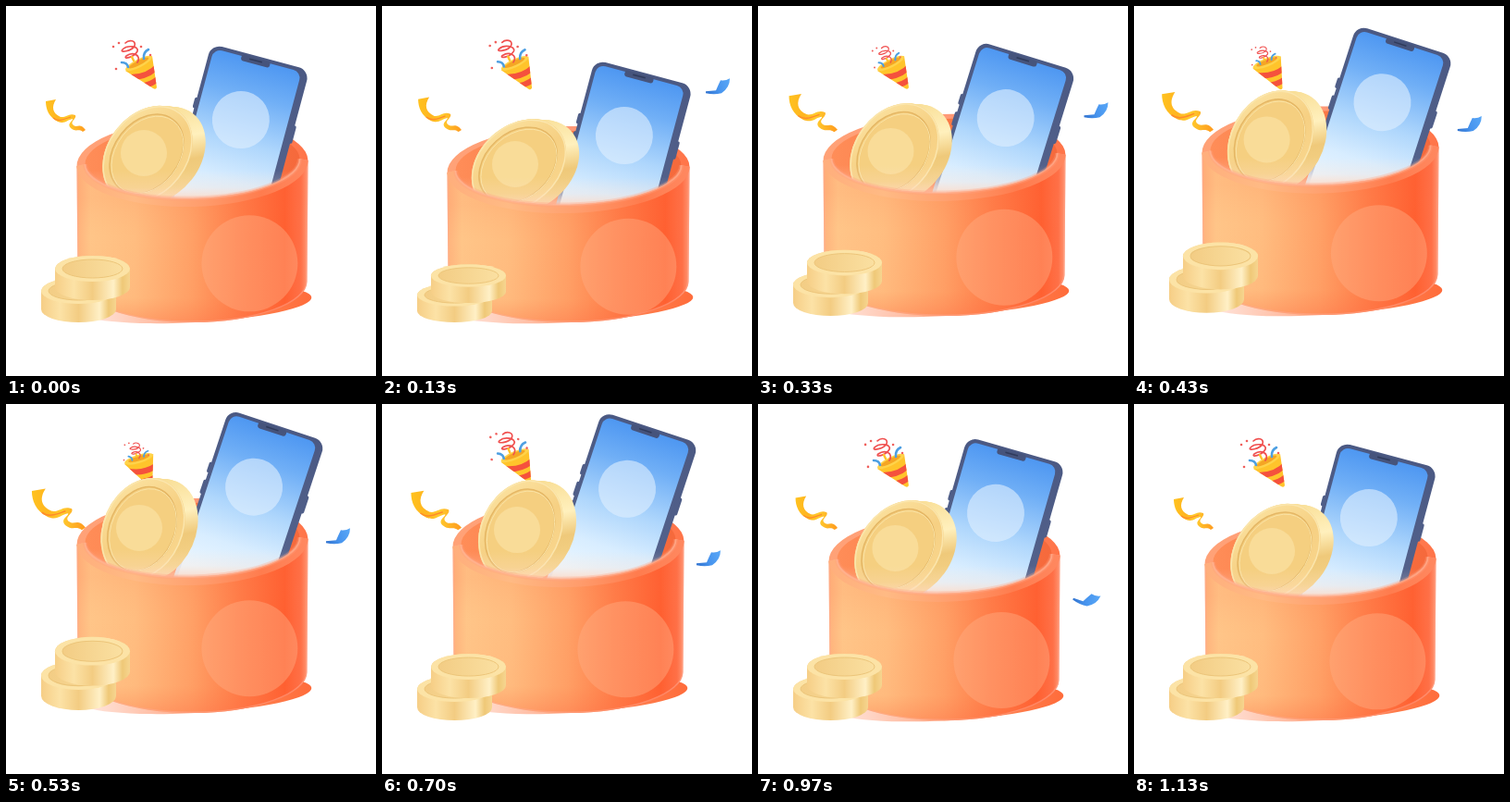
An HTML page with a canvas for the animation above (2.01 s loop, 400x400 px).

```html
<!DOCTYPE html>
<html lang="en">
<head>
<meta charset="utf-8">
<title>Gift pot</title>
<style>
  html, body { margin: 0; width: 100%; height: 100%; overflow: hidden; background: #fff; }
  canvas { display: block; width: 100vw; height: 100vh; }
</style>
</head>
<body>
<canvas id="stage"></canvas>
<script>
const LOOP = 2010;
const TIMES = [0, 130, 330, 530, 700, 830, 1130];
const TRACKS = {
  phoneX: [222, 230, 239, 241, 238, 233, 222],
  phoneY: [41, 58, 38, 6, 8, 25, 41],
  phoneA: [15, 15, 17.2, 18.3, 18.3, 17.3, 15],
  coinX: [153, 148, 147.5, 148, 150, 151.5, 153],
  coinY: [160, 172, 158, 135, 137, 150.5, 160],
  coinA: [38, 48, 36, 24, 26, 32, 38],
  potL: [76.5, 70.5, 70.5, 76.5, 76.5, 76.5, 76.5],
  rim: [208, 215, 202, 187, 189, 199, 208],
  base: [342, 342, 335, 334, 334, 341, 342],
  stackY: [342, 342, 335, 331, 342, 342, 342],
  stackS: [1, 0.87, 0.99, 1.1, 1, 1, 1],
  popY: [0, 0, 0, -2, -6, -1, 0],
  popA: [0, 2, 0, 10, 4, 1, 0],
  burst: [1, 1, 0.75, 0.68, 1, 1, 1],
  ribbon: [1, 1.09, 1.22, 1.35, 1.27, 1.15, 1],
  bitX: [360, 363, 365.5, 359, 353, 353.5, 356],
  bitY: [69, 87, 113, 143, 167, 185.5, 228]
};
const TILT = -0.025;
const TAU = Math.PI * 2;
const canvas = document.getElementById('stage');
const c = canvas.getContext('2d');

// Smooth curve through the poses, at rest at both ends.
function track(v, t) {
  const last = TIMES.length - 1;
  if (t >= TIMES[last]) return v[last];
  let i = 0;
  while (t >= TIMES[i + 1]) i++;
  const slope = k => k === 0 || k === last ? 0 : (v[k + 1] - v[k - 1]) / (TIMES[k + 1] - TIMES[k - 1]);
  const d = TIMES[i + 1] - TIMES[i], u = (t - TIMES[i]) / d, w = 1 - u;
  return w * w * (1 + 2 * u) * v[i] + u * u * (3 - 2 * u) * v[i + 1]
    + u * w * d * (w * slope(i) - u * slope(i + 1));
}

function gradient(x0, y0, x1, y1, stops) {
  const g = c.createLinearGradient(x0, y0, x1, y1);
  for (const [at, color] of stops) g.addColorStop(at, color);
  return g;
}

function fill(path, style) { c.fillStyle = style; c.fill(path); }

function line(path, style, width) {
  c.strokeStyle = style;
  c.lineWidth = width;
  c.stroke(path);
}

function oval(x, y, rx, ry, a = 0) {
  const p = new Path2D();
  p.ellipse(x, y, rx, ry, a, 0, TAU);
  return p;
}

function at(x, y, angle, draw) {
  c.save();
  c.translate(x, y);
  c.rotate(angle * Math.PI / 180);
  draw();
  c.restore();
}

function ribbon(s) {
  c.save();
  c.translate(86, 135);
  c.scale(s, 1 + (s - 1) * 0.8);
  const band = new Path2D('M-43 -32L-32 -34C-37 -26 -36 -19 -27 -15C-21 -14 -18 -20 -11 -17C-9 -13 -18 -10 -13 -6C-9 -3 -6 -9 0 -1L-3 1C-8 -3 -10 2 -16 -3C-21 -8 -13 -11 -14 -13C-20 -12 -22 -7 -30 -10C-40 -15 -43 -24 -43 -32Z');
  fill(band, gradient(-43, 0, 0, 0, [[0, '#ffc21f'], [0.3, '#ffb520'], [0.55, '#ffcb2e'], [1, '#ff9a1e']]));
  line(new Path2D('M-35 -14C-29 -9 -22 -13 -16 -15'), '#ff8a2b', 1.2);
  c.restore();
}

function popper(p) {
  at(147, 62 + p.popY, p.popA, () => {
    const cone = new Path2D('M-18 8L11 -8L16 26Q15 29 12 27Z');
    fill(cone, '#ffc42b');
    c.save();
    c.clip(cone);
    line(new Path2D('M-15 15Q6 16 18 2M-2 25Q12 23 20 14'), '#f5513d', 6);
    c.restore();
    fill(oval(-3.5, 0, 16, 4.5, -0.47), '#ffd34a');
    fill(oval(-3.5, -0.5, 12, 2.6, -0.47), '#f5a524');
    c.scale(p.burst, p.burst);
    c.lineCap = 'round';
    line(new Path2D('M-5 -1C0 -9 -10 -13 -17 -8C-21 -4 -9 -6 -5 -13C-3 -19 -16 -20 -21 -15C-25 -11 -11 -13 -8 -19C-6 -25 -14 -26 -18 -22'), '#f0504f', 1.7);
    line(new Path2D('M2 -5Q1 -12 7 -15M-22 -1Q-16 -1 -15 4'), '#4d9fe2', 2.6);
    line(new Path2D('M-9 -3L-11 -7'), '#ffc42b', 2.5);
    for (const [x, y] of [[-31, -18], [-28, 6], [9, -9], [-25, -22], [-1, -18]]) fill(oval(x, y, 1.3, 1.3), '#f0605c');
  });
}

function bit(p) {
  at(p.bitX, p.bitY, p.bitY > 170 ? (p.bitY - 170) * 0.6 : 0, () => {
    fill(new Path2D('M-13 5L-2 4Q1 -3 3 -7Q8 -6 13 -9Q13 1 4 7Q-4 9 -13 7Z'),
      gradient(-13, 4, 13, -4, [[0, '#3476d2'], [0.5, '#4794ee'], [1, '#58a6f6']]));
  });
}

function phone(p) {
  at(p.phoneX, p.phoneY, p.phoneA, () => {
    const shell = new Path2D(), screen = new Path2D(), notch = new Path2D();
    shell.roundRect(0, 0, 110, 210, 12);
    shell.roundRect(-2, 60, 5, 12, 2);
    shell.roundRect(-2, 80, 5, 16, 2);
    shell.roundRect(107, 62, 5, 20, 2);
    screen.roundRect(4, 4, 98, 206, 9);
    notch.roundRect(35, 2, 32, 7, 3);
    fill(shell, gradient(0, 0, 0, 175, [[0, '#4b5983'], [0.75, '#53628c'], [1, '#dbe8f8']]));
    fill(screen, gradient(0, 0, 0, 172, [[0, '#4b95f1'], [0.25, '#70aff6'], [0.55, '#aed6fc'], [0.8, '#d8edff'], [1, '#eaf6ff']]));
    fill(notch, '#46547c');
    line(new Path2D('M44 5H58'), '#2f3b5c', 1.5);
    fill(oval(52, 71, 31, 31), 'rgba(225,241,255,.6)');
  });
}

function bigCoin(p) {
  const a = p.coinA * Math.PI / 180, x = p.coinX, y = p.coinY;
  const edge = gradient(x + 10, y - 50, x + 28, y + 50, [[0, '#f9df98'], [0.35, '#fff0bd'], [0.6, '#efc97a'], [1, '#f6d58c']]);
  for (let i = 14; i >= 0; i--) fill(oval(x + i, y + i * 0.08, 43, 57, a), edge);
  const face = gradient(x - 30, y - 45, x + 30, y + 45, [[0, '#fbe2a0'], [0.5, '#f6d083'], [1, '#f9d78f']]);
  fill(oval(x, y, 43, 57, a), face);
  line(oval(x, y, 42, 56, a), '#fbe6ad', 1.4);
  fill(oval(x - 1, y, 35, 47, a), '#f5cf80');
  line(oval(x - 1, y, 35, 47, a), '#e5b765', 1.5);
  line(oval(x, y + 1, 34, 46, a), '#fae3a5', 1);
  fill(oval(x - 4, y - 1, 25, 25), '#f9dc98');
}

function disc(x, y) {
  const rx = 40.5, ry = 14, h = 20, side = new Path2D();
  side.ellipse(x, y + h, rx, ry, 0, 0, Math.PI);
  side.ellipse(x, y, rx, ry, 0, Math.PI, 0);
  fill(side, gradient(x - rx, 0, x + rx, 0, [[0, '#f6ce86'], [0.25, '#fce2a6'], [0.5, '#f3cc82'], [0.78, '#fff0c6'], [0.9, '#efc877'], [1, '#f6d590']]));
  fill(oval(x, y, rx, ry), '#fce3a6');
  fill(oval(x, y, rx - 8, ry - 4), gradient(x - 30, y, x + 30, y, [[0, '#f3cd85'], [1, '#fadf a0'.replace(' ', '')]]));
  line(oval(x, y, rx - 8, ry - 4), '#ecc57a', 1);
}

function stack(p) {
  c.save();
  c.translate(0, p.stackY);
  c.scale(1, p.stackS);
  disc(78.5, -34);
  disc(93.5, -58);
  c.restore();
}

function potShape(p) {
  const l = p.potL, r = 403 - l, x = (l + r) / 2, rx = (r - l) / 2;
  return { l, r, x, rx, oy: p.rim - 38, iy: p.rim - 40, irx: rx - 9 };
}

function potBack(p, s) {
  fill(oval(s.x + 2, p.base - 20, s.rx + 2, 20, -0.055),
    gradient(s.l, 0, s.r, 0, [[0, '#ffece6'], [0.3, '#ffc4ad'], [0.75, '#ff8250'], [1, '#ff6d3c']]));
  fill(oval(s.x, s.oy, s.rx, 47, TILT), gradient(s.l, 0, s.r, 0, [[0, '#ffa277'], [0.5, '#ff9a78'], [1, '#ff7448']]));
  fill(oval(s.x, s.iy, s.irx, 40, TILT), gradient(s.l, 0, s.r, 0, [[0, '#ff8f5a'], [0.4, '#fb7d48'], [1, '#f5683b']]));
}

// Warm haze where the contents sink behind the rim.
function haze(p, s) {
  fill(oval(s.x, s.iy, s.irx, 40, TILT), gradient(0, p.rim - 30, 0, p.rim,
    [[0, 'rgba(255,225,205,0)'], [0.6, 'rgba(255,222,202,.25)'], [1, 'rgba(255,212,188,.75)']]));
}

function potFront(p, s) {
  const body = new Path2D(), lip = new Path2D(), inner = new Path2D();
  body.moveTo(s.l, s.oy + 3);
  body.lineTo(s.l + 1, p.base - 46);
  body.ellipse(s.x, p.base - 44, s.rx - 1, 44, 0, Math.PI, 0, true);
  body.lineTo(s.r, s.oy - 3);
  body.ellipse(s.x, s.iy, s.irx, 40, TILT, 0, Math.PI);
  body.closePath();
  fill(body, gradient(s.l, 0, s.r, 0, [[0, '#ffb27c'], [0.06, '#ffc588'], [0.25, '#ffbd80'], [0.5, '#ffa066'], [0.7, '#ff7c48'], [0.9, '#ff5f30'], [0.97, '#ff7047'], [1, '#ff9a78']]));
  c.save();
  c.clip(body);
  fill(body, gradient(0, p.rim, 0, p.base, [[0, 'rgba(255,110,70,.1)'], [0.3, 'rgba(255,140,90,0)'], [0.8, 'rgba(255,115,65,.04)'], [1, 'rgba(255,105,65,.35)']]));
  line(body, 'rgba(255,170,145,.5)', 3);
  c.restore();

  lip.ellipse(s.x, s.oy, s.rx, 47, TILT, 0, Math.PI);
  lip.ellipse(s.x, s.iy, s.irx, 40, TILT, Math.PI, 0, true);
  lip.closePath();
  fill(lip, gradient(s.l, 0, s.r, 0, [[0, '#ffae7c'], [0.25, '#ffba84'], [0.55, '#ff9c6c'], [0.8, '#ff7c4e'], [1, '#ff8860']]));
  inner.ellipse(s.x, s.iy, s.irx, 40, TILT, 0, Math.PI);
  line(inner, 'rgba(255,160,125,.3)', 5);
  line(inner, 'rgba(255,180,150,.6)', 2);

  fill(oval(s.x + s.rx * 0.495, p.rim + (p.base - p.rim) * 0.525, 52, 52), 'rgba(255,170,130,.45)');
}

function draw(t) {
  const p = {};
  for (const name in TRACKS) p[name] = track(TRACKS[name], t);
  const s = potShape(p);
  c.clearRect(0, 0, 400, 400);
  ribbon(p.ribbon);
  popper(p);
  if (t >= 30 && t < 1000) bit(p);
  potBack(p, s);
  phone(p);
  bigCoin(p);
  haze(p, s);
  potFront(p, s);
  stack(p);
}

function fit() {
  const dpr = window.devicePixelRatio || 1;
  canvas.width = Math.round(innerWidth * dpr);
  canvas.height = Math.round(innerHeight * dpr);
  c.setTransform(canvas.width / 400, 0, 0, canvas.height / 400, 0, 0);
}

const start = performance.now();
function tick() {
  draw((performance.now() - start) % LOOP);
  requestAnimationFrame(tick);
}

addEventListener('resize', fit);
fit();
tick();
</script>
</body>
</html>
```
